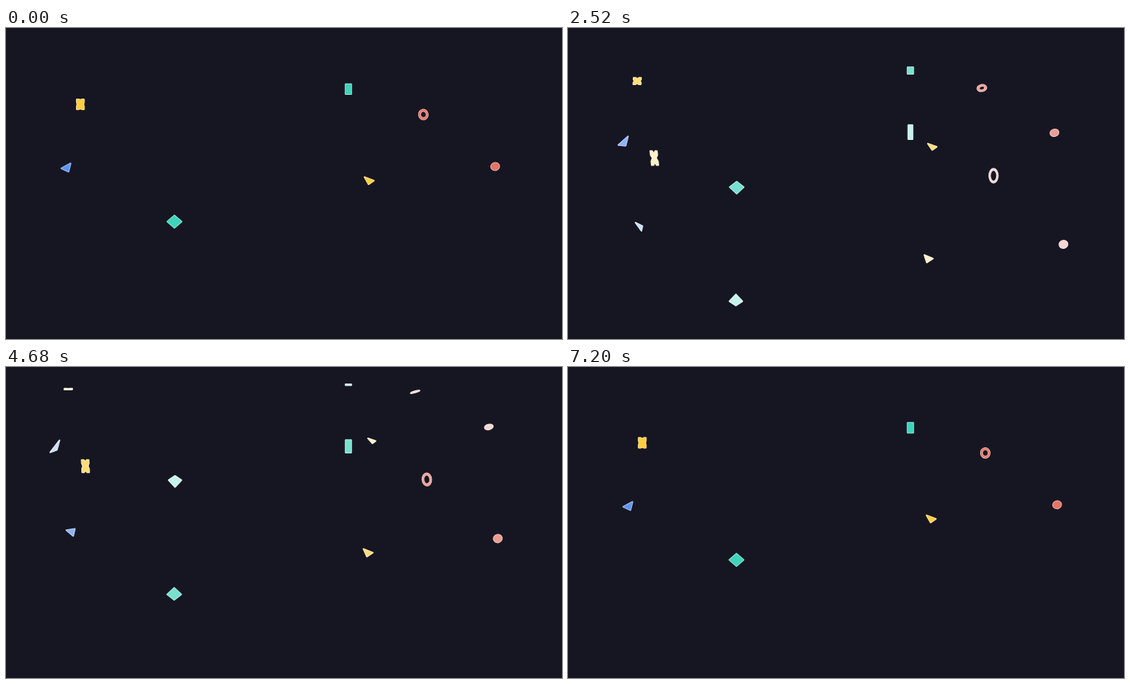
An HTML page with a canvas that plays this animation: 738 by 414 pixels, repeating every 7260 ms.

```html
<!DOCTYPE html>
<html>
<head>
<meta charset="utf-8">
<style>
html, body { margin: 0; width: 100%; height: 100%; overflow: hidden; background: #161622; }
canvas { display: block; }
</style>
</head>
<body>
<canvas id="stage" width="738" height="414"></canvas>
<script>
const ctx = document.getElementById('stage').getContext('2d');
const LOOP = 7260, STEP = 60, HALF = 3612, LIFE = 2 * HALF;
const TEAL = [62, 211, 186], YELLOW = [255, 205, 66], RED = [228, 116, 102], BLUE = [94, 148, 240];

// In every shape, s is the time in seconds from the middle of the fall.

// Height of a flat piece that tips up towards the viewer
const tipHeight = s => Math.max(1, 20.6 * Math.sin((s + 3.07) * Math.PI / 12));

function poly(points) {
  for (const [x, y] of points) ctx.lineTo(x, y);
  ctx.closePath();
}

// Triangle that turns from one pose to another and is largest midway
const triangle = (from, to) => s => {
  const k = (s + 2.5) / 5.2, size = 1 + .18 * (1 - (s / 2.7) ** 2);
  poly(from.map((p, i) => p.map((v, j) => (v + (to[i][j] - v) * k) * size)));
};

const wedge = triangle([[-4.8, -3.2], [5.2, .2], [1, 3.4]], [[-5.6, -5], [5.6, -.4], [-2.5, 4.9]]);
const shard = triangle([[5.8, -8], [2.5, 4.5], [-6.2, 7.6]], [[4.2, -.8], [3, 5.2], [-4.6, -6]]);

function diamond(s) {
  const w = 9.5 - .15 * s * s, h = 8.2 - .12 * s * s, mid = .7 * s;
  poly([[-w, mid], [0, -h], [w, mid], [0, h]]);
}

// Square with a notch in each side
function cross(s) {
  const w = 4.8 - .15 * s, h = Math.max(.5, tipHeight(s) / 2 - .8);
  const notch = .15 + .13 * Math.abs(s), points = [];
  for (let side = 0; side < 4; side++) {
    const c = Math.round(Math.cos(side * Math.PI / 2)), n = Math.round(Math.sin(side * Math.PI / 2));
    for (const [x, y] of [[-1, -1], [-.45, -1], [0, notch - 1], [.45, -1]]) {
      const py = (x * n + y * c) * h;
      points.push([(x * c - y * n) * w + py * .04 * s, py]);
    }
  }
  poly(points);
}

function block(s) {
  const w = 7.6 - .12 * Math.max(0, s) ** 3, h = Math.max(1, tipHeight(s) - 1.6);
  ctx.rect(-w / 2, -h / 2, w, h);
}

function ring(s) {
  const rx = 6 - .1 * s, ry = Math.max(.9, tipHeight(s) / 2 - .8);
  const tilt = .2 * s / 3.6 - .14;
  for (const k of [1, .7 + .04 * s]) {
    ctx.moveTo(rx * k * Math.cos(tilt), rx * k * Math.sin(tilt));
    ctx.ellipse(0, 0, rx * k, ry * k, tilt, 0, 2 * Math.PI);
  }
}

function disc(s) {
  ctx.ellipse(0, 0, 5.5, 5.1 - .13 * (s - 1.2) ** 2, -.25, 0, 2 * Math.PI);
}

// Shape, colour, midpoint, speed in px per second
const pieces = [
  [cross, YELLOW, 98.7, 101.6, 6.3, 28.4],
  [block, TEAL, 454.5, 81.4, 0, 22.7],
  [ring, RED, 554, 115.2, 4.3, 32.3],
  [disc, RED, 649.3, 184.4, 3.3, 41.1],
  [wedge, YELLOW, 482, 203.2, -1.3, 41.3],
  [shard, BLUE, 79.8, 185.6, 5.8, 31.4],
  [diamond, TEAL, 223.6, 257.7, -.3, 41.4]
];

const tint = (rgb, a) => `rgb(${rgb.map(c => Math.round(255 + (c - 255) * a))})`;

// Pieces fade towards white and vanish once they are too faint
function drawSet(u) {
  const strength = 1 - Math.abs(u - HALF) / HALF;
  if (strength < .2) return;
  const s = (u - HALF) / 1000;
  for (const [shape, color, x, y, vx, vy] of pieces) {
    ctx.save();
    ctx.translate(x + vx * s, y + vy * s);
    ctx.beginPath();
    shape(s);
    ctx.strokeStyle = tint(color, strength * .6);
    ctx.stroke();
    ctx.fillStyle = tint(color, strength);
    ctx.fill('evenodd');
    ctx.restore();
  }
}

function draw() {
  const t = Math.floor(performance.now() % LOOP / STEP) * STEP;
  ctx.fillStyle = '#161622';
  ctx.fillRect(0, 0, 738, 414);
  ctx.lineWidth = 2;
  ctx.lineJoin = 'round';
  drawSet(t % LIFE);
  drawSet((t + HALF) % LIFE);
  requestAnimationFrame(draw);
}
draw();
</script>
</body>
</html>
```
